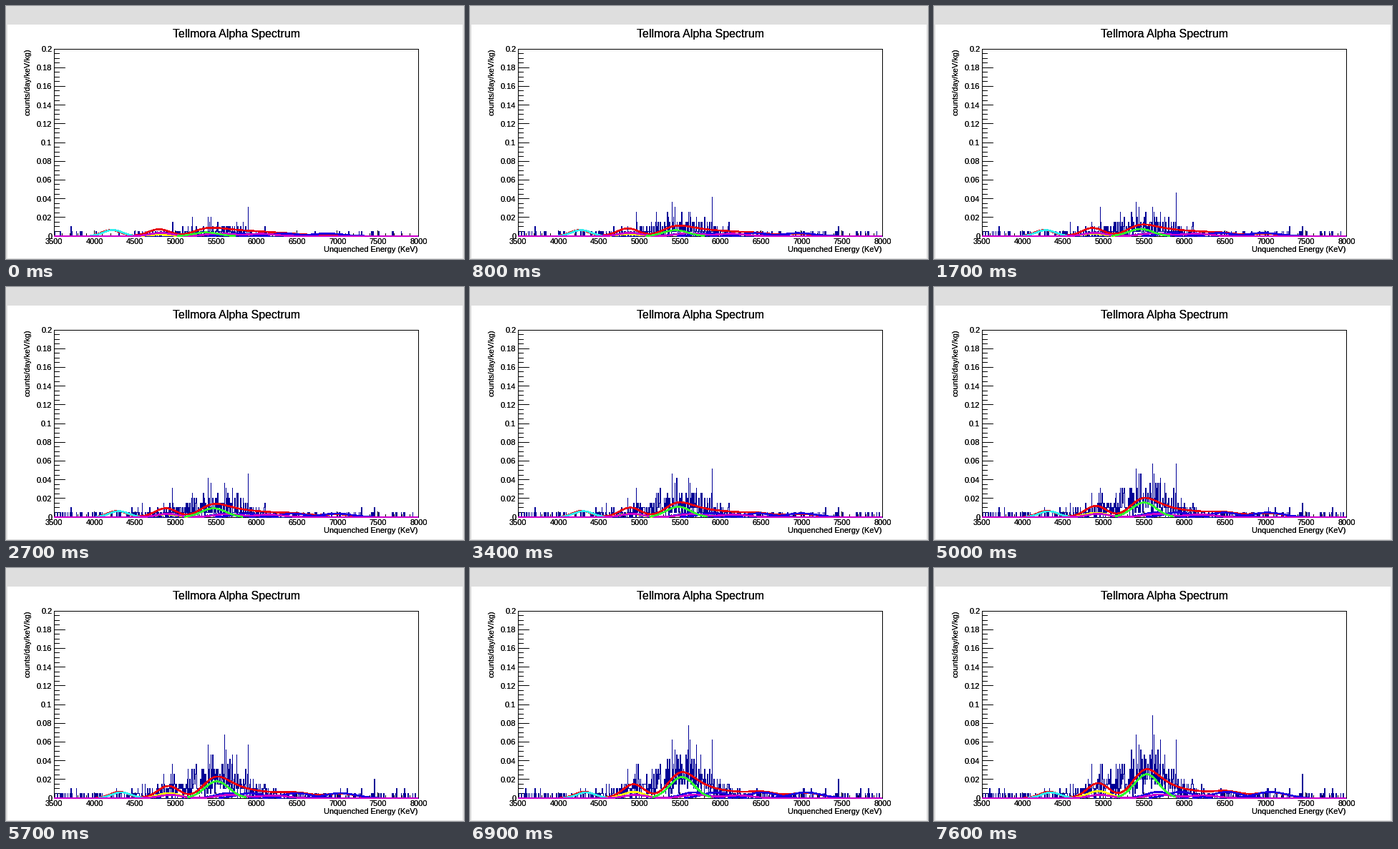
Animation of 640x354 px, one loop 8000 ms. Source, as a matplotlib script:

```python
import numpy as np
import matplotlib.pyplot as plt
from matplotlib.animation import FuncAnimation
from matplotlib.patches import Rectangle

W, H, DPI = 640, 354, 100
STEP, FRAMES = 100, 80
PX = 72 / DPI
LEFT, RIGHT, TOP, BASE = 67, 576, 60, 322
E0, E1, VMAX = 3500, 8000, 0.2
BIN = 5
UNIT = 0.00521  # height of a single count

plt.rcParams["font.family"] = "Liberation Sans"
plt.rcParams["path.simplify"] = False

# bursts of updates, first ms: number of steps
BURSTS = {100: 2, 700: 2, 1300: 3, 1700: 1, 2100: 2, 2400: 6, 3400: 2,
          3700: 2, 4100: 2, 4800: 4, 5500: 3, 6200: 2, 6900: 2, 7500: 2}
UPDATES = [0] + [t + STEP * k for t, n in BURSTS.items() for k in range(n)]

# unusually tall bins: energy, final count, growth power
TALL = [(4850, 7, 1), (5205, 6, .2), (5400, 13, .6), (5435, 11, .6),
        (5600, 17, 1.1), (5620, 13, .9), (5700, 12, 1), (5895, 12, .35)]

# fitted peaks: final centre, early and final height in 1/1000
TOTAL = [(4330, 6.5, 6.8), (4935, 7.3, 16), (5500, 6, 26), (5720, 5, 11),
         (5950, 3.5, 6), (6200, 3.5, 4.5), (6530, 2.8, 7), (7070, 2, 6.3)]
BACKGROUND = [(4960, 3.5, 3.5), (5700, 3, 3.8), (6230, 2.5, 3)]
SINGLES = [("#30eeee", 4350, 6.5, 6), ("#ffff00", 4940, 1.5, 7.5)]
SINGLES += [("#1c00e0", c, 2.8, 6.6) for c in (5680, 5950, 6530, 7070)]
SINGLES += [("#30ff30", 5535, 4, 25.5)]


def px(energy):
    return LEFT + (energy - E0) / (E1 - E0) * (RIGHT - LEFT)


def py(value):
    return BASE - value / VMAX * (BASE - TOP)


def share(ms):
    """Part of the data collected at the latest update."""
    t = max(u for u in UPDATES if u <= ms)
    late = max(0, (t - 200) / 7400)
    return .16 + .14 * min(t / 200, 1) + .7 * late ** 1.35


def shape(peak, p):
    centre, early, final = peak
    s = (p - .16) / .84
    mid = centre * (.972 + .028 * s ** .5)
    return mid, .027 * centre, (early + (final - early) * s ** 1.35) / 1000


def bell(x, mid, sigma, height):
    return height * np.exp(-((x - mid) / sigma) ** 2 / 2)


# random events, each with the moment it arrives
rng = np.random.default_rng(12)
edges = np.arange(E0, E1 + BIN, BIN)
n_bins = len(edges) - 1
rate = .25 + bell(edges[:-1], 5560, 280, 5.3) + bell(edges[:-1], 4930, 150, 2.3)
events = np.repeat(np.arange(n_bins), np.minimum(rng.poisson(rate), 10))
arrival = rng.random(len(events))
edge_px = np.round(px(edges)) + .5


def counts(p):
    n = np.bincount(events[arrival < p], minlength=n_bins)
    for energy, final, power in TALL:
        n[(energy - E0) // BIN] = round(final * p ** power)
    return n


fig = plt.figure(figsize=(W / DPI, H / DPI), dpi=DPI, facecolor="#dedede")
ax = fig.add_axes([0, 0, 1, 1])
ax.set(xlim=(0, W), ylim=(H, 0))
ax.axis("off")
ax.add_patch(Rectangle((2, 26), 636, 327, fc="white", lw=0, zorder=0))


def line(color, width, z, x=(), y=()):
    return ax.plot(x, y, color=color, lw=width * PX, zorder=z,
                   antialiased=False, solid_capstyle="butt")[0]


def label(x, y, text, size=11, ha="right", va="baseline", **kw):
    for _ in range(2):  # drawn twice for darker edges
        ax.text(x, y, text, fontsize=size * PX, color="black", zorder=3,
                ha=ha, va=va, **kw)


def tick(x0, y0, x1, y1):
    line("black", 1, 2, np.floor([x0, x1]), np.floor([y0, y1]))


ax.add_patch(Rectangle((LEFT, TOP), RIGHT - LEFT, BASE - TOP, fill=False,
                       ec="black", lw=PX, antialiased=False, zorder=2))
for i in range(41):
    y = py(.005 * i)
    tick(LEFT, y, LEFT + (7 if i % 4 else 15), y)
    if i % 4 == 0:
        label(64.3, y, f"{.005 * i:.2g}", va="center_baseline")
for i in range(46):
    x = px(E0 + 100 * i)
    tick(x, BASE, x, BASE - (4 if i % 5 else 8))
    if i % 5 == 0:
        label(x + .3, 333, str(E0 + 100 * i), ha="center")

label(322, 44, "Tellmora Alpha Spectrum", 16, ha="center")
label(576, 344, "Unquenched Energy (KeV)")
label(34, 59.5, "counts/day/keV/kg)", rotation=90, rotation_mode="anchor")

CURVE = 1.6
hist = line("#000096", 1, 4)
total = line("#e8000d", CURVE, 5)
background = line("#cc00cc", CURVE, 7)
singles = [(peak, line(color, CURVE, 8 if color == "#30ff30" else 6))
           for color, *peak in SINGLES]
sums = [(total, np.linspace(4020, 7500, 400), TOTAL),
        (background, np.linspace(E0, E1, 500), BACKGROUND)]


def draw(i):
    p = share(i * STEP)
    tops = np.round(py(counts(p) * UNIT)) + .5
    hist.set_data(np.repeat(edge_px, 2)[1:-1], np.repeat(tops, 2))
    for curve, xs, peaks in sums:
        ys = sum(bell(xs, *shape(k, p)) for k in peaks)
        curve.set_data(px(xs), py(ys))
    for peak, curve in singles:
        mid, sigma, height = shape(peak, p)
        xs = mid + sigma * np.linspace(-2.4, 2.4, 120)
        curve.set_data(px(xs), py(bell(xs, mid, sigma, height)))
    return []


anim = FuncAnimation(fig, draw, frames=FRAMES, interval=STEP, repeat=True,
                     repeat_delay=0, blit=False)
plt.show()
```
